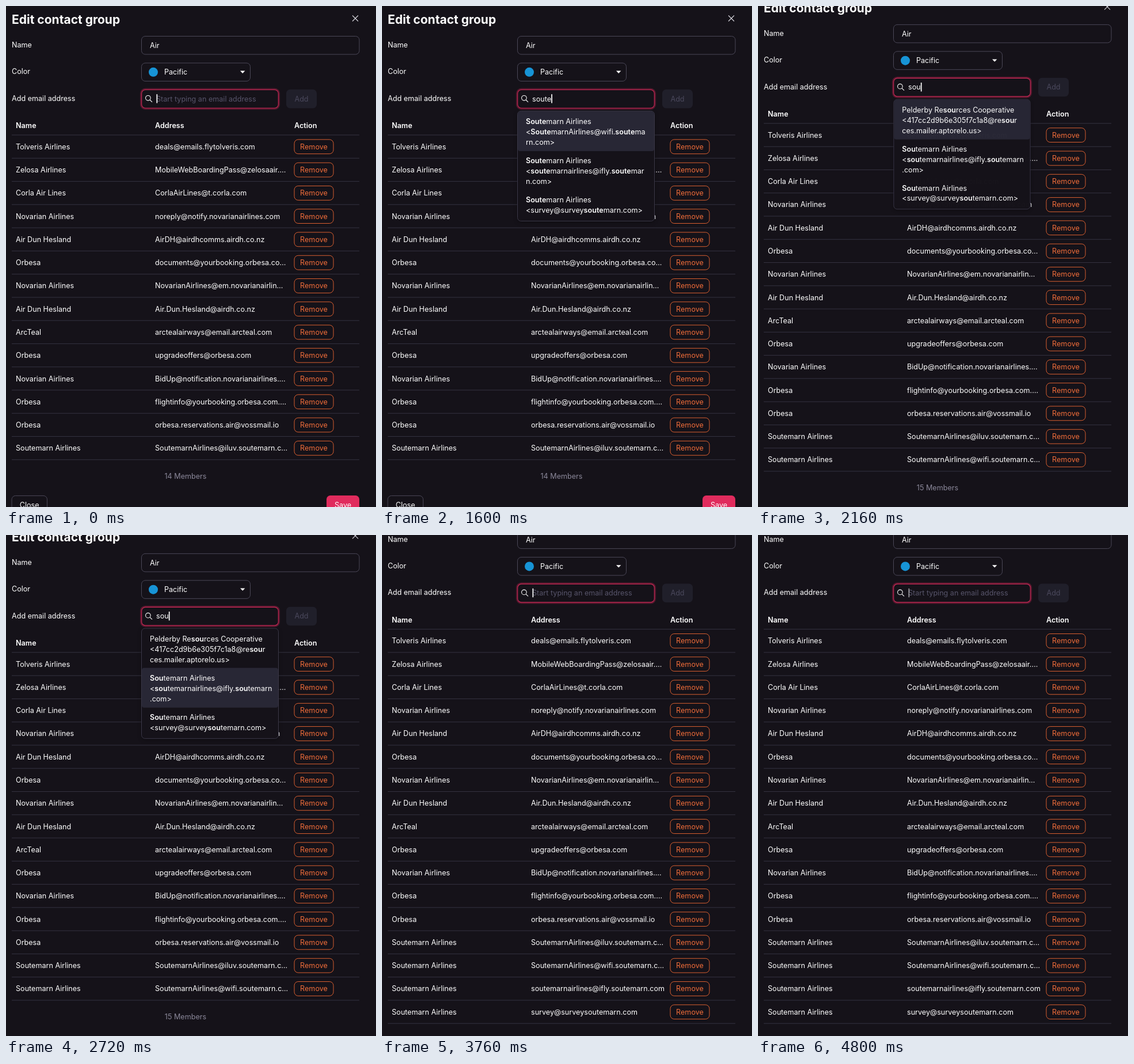
Animation, 643 px wide and 870 px high, one loop 4880 ms. Source, as an HTML page:

```html
<!DOCTYPE html>
<html lang="en">
<head>
<meta charset="utf-8">
<title>Edit contact group</title>
<style>
html, body { margin: 0; width: 100%; height: 100%; overflow: hidden; background: #151219; }
svg { display: block; width: 643px; height: 870px; }
text { font: 12.6px Inter, sans-serif; fill: #fff; white-space: pre; }
.b { font-weight: 600; }
.mid { text-anchor: middle; }
.box { fill: none; stroke: #4a4757; }
.rule { stroke: #343240; }
#drop { filter: drop-shadow(0 2px 3px rgba(0, 0, 0, .3)); }
</style>
</head>
<body>
<svg id="stage" viewBox="0 0 643 870"></svg>
<script>
const NS = 'http://www.w3.org/2000/svg';
const LOOP = 4880, STEP = 80, ROW = 40.27, BASE = 14;
const BG = '#151219';

const el = (parent, tag, attrs = {}, str) => {
  const n = document.createElementNS(NS, tag);
  for (const k in attrs) n.setAttribute(k, attrs[k]);
  if (str !== undefined) n.textContent = str;
  parent.appendChild(n);
  return n;
};
const text = (p, x, y, str, attrs = {}) => el(p, 'text', { x, y, ...attrs }, str);
const rect = (p, x, y, width, height, rx, attrs = {}) =>
  el(p, 'rect', { x, y, width, height, rx, ...attrs });
const clamp = v => Math.max(0, Math.min(1, v));
const show = (n, on) => n.setAttribute('visibility', on ? 'visible' : 'hidden');

const members = [
  ['Tolveris Airlines', 'deals@emails.flytolveris.com'],
  ['Zelosa Airlines', 'MobileWebBoardingPass@zelosaair.…'],
  ['Corla Air Lines', 'CorlaAirLines@t.corla.com'],
  ['Novarian Airlines', 'noreply@notify.novarianairlines.com'],
  ['Air Dun Hesland', 'AirDH@airdhcomms.airdh.co.nz'],
  ['Orbesa', 'documents@yourbooking.orbesa.co…'],
  ['Novarian Airlines', 'NovarianAirlines@em.novarianairlin…'],
  ['Air Dun Hesland', 'Air.Dun.Hesland@airdh.co.nz'],
  ['ArcTeal', 'arctealairways@email.arcteal.com'],
  ['Orbesa', 'upgradeoffers@orbesa.com'],
  ['Novarian Airlines', 'BidUp@notification.novarianairlines.…'],
  ['Orbesa', 'flightinfo@yourbooking.orbesa.com.…'],
  ['Orbesa', 'orbesa.reservations.air@vossmail.io'],
  ['Soutemarn Airlines', 'SoutemarnAirlines@iluv.soutemarn.c…'],
  ['Soutemarn Airlines', 'SoutemarnAirlines@wifi.soutemarn.c…'],
  ['Soutemarn Airlines', 'soutemarnairlines@ifly.soutemarn.com'],
  ['Soutemarn Airlines', 'survey@surveysoutemarn.com']
];

const air = 'Soutemarn Airlines';
const survey = [air, '<survey@surveysoutemarn.com>'];
const estate = ['Pelderby Resources Cooperative', '<417cc2d9b6e305f7c1a8@resour', 'ces.mailer.aptorelo.us>'];

// Each round: key times, dropdown opening, highlight moving down, row added.
const rounds = [
  { word: 'soute', keys: [1400, 1420, 1435, 1520, 1580], open: 1440, down: Infinity, add: 1840,
    items: [[air, '<SoutemarnAirlines@wifi.soutema', 'rn.com>'],
            [air, '<soutemarnairlines@ifly.soutemar', 'n.com>'], survey] },
  { word: 'sou', keys: [1920, 1980, 2015], open: 2020, down: 2560, add: 2960,
    items: [estate, [air, '<soutemarnairlines@ifly.soutemarn', '.com>'], survey] },
  { word: 'sou', keys: [3010, 3060, 3110], open: 3128, down: 3520, add: 3760,
    items: [estate, survey] }
];

const page = el(document.getElementById('stage'), 'g');

// Form
text(page, 10, 31.3, 'Edit contact group', { style: 'font-size:21px;font-weight:700' });
el(page, 'path', { d: 'M602 16.5l10 10m0-10l-10 10', stroke: '#d8d6de', 'stroke-width': 1.1 });
text(page, 10, 72, 'Name');
rect(page, 235.5, 52.5, 378.5, 31.5, 6.5, { class: 'box' });
text(page, 250, 73, 'Air');
text(page, 10, 118.3, 'Color');
rect(page, 235.5, 99, 189, 31.5, 6.5, { class: 'box' });
el(page, 'circle', { cx: 256, cy: 114.8, r: 8, fill: '#1794d6' });
text(page, 275, 119.4, 'Pacific');
el(page, 'path', { d: 'M407 112.6h8.4l-4.2 4.4z', fill: '#fff' });
text(page, 10, 164.8, 'Add email address');
rect(page, 234.5, 144.3, 240, 34.2, 7.5, { fill: 'none', stroke: '#e2265a', 'stroke-opacity': .32, 'stroke-width': 3 });
rect(page, 235.7, 145.5, 237.6, 31.8, 6.5, { fill: BG, stroke: '#cb2a57', 'stroke-width': 1.1 });
el(page, 'path', { d: 'M251.2 159.8a4.3 4.3 0 1 1-8.6 0a4.3 4.3 0 1 1 8.6 0M250 163l4 3.8',
  fill: 'none', stroke: '#fff', 'stroke-width': 1.1 });
const hint = text(page, 261, 165.6, 'Start typing an email address', { style: 'fill:#57546a' });
const query = text(page, 261, 165.6, '');
const caret = rect(page, 261.5, 153.2, 1.7, 15.4, 0, { fill: '#fff' });
rect(page, 487, 145, 53, 32.4, 6.5, { fill: '#201f2a' });
text(page, 513.5, 165.6, 'Add', { class: 'mid', style: 'fill:#4a485c' });

// Table
const rule = (p, y) => el(p, 'line', { x1: 10, x2: 614, y1: y, y2: y, class: 'rule' });
[['Name', 17], ['Address', 259], ['Action', 501]].forEach(([s, x]) =>
  text(page, x, 212.4, s, { class: 'b' }));
rule(page, 224);
const rows = members.map(([name, mail], i) => {
  const y = 244.3 + i * ROW, g = el(page, 'g');
  text(g, 17, y + 4.5, name);
  text(g, 259, y + 4.5, mail);
  rect(g, 501, y - 12.4, 68, 24.8, 6.8, { fill: 'none', stroke: '#d95f30' });
  text(g, 535, y + 4.5, 'Remove', { class: 'mid', style: 'fill:#f06d3a' });
  rule(g, y + 20);
  return g;
});

// Footer
const foot = el(page, 'g');
const total = text(foot, 312, 821, '', { class: 'mid', style: 'fill:#8b889a' });
rect(foot, 10, 850.4, 61.5, 32, 6.5, { class: 'box' });
text(foot, 40.7, 870.8, 'Close', { class: 'mid' });
rect(foot, 557, 850, 57, 32.4, 6.5, { fill: '#e02b5d' });
text(foot, 585.5, 870.8, 'Save', { class: 'mid' });

const drop = el(page, 'g', { id: 'drop' });

function marked(x, y, line, word) {
  const n = text(drop, x, y, '');
  line.split(new RegExp('(' + word + ')', 'i')).forEach((part, i) => {
    if (part) el(n, 'tspan', i % 2 ? { class: 'b' } : {}, part);
  });
}

function drawDrop(items, word, active) {
  drop.replaceChildren();
  const panel = rect(drop, 235.5, 182.3, 238, 0, 6, { fill: BG, stroke: '#3a3747' });
  let y = 184;
  items.forEach((lines, i) => {
    const h = lines.length * 18 + 14;
    if (i === active) rect(drop, 236, y - 1, 237, h + 1, 4, { fill: '#282735' });
    lines.forEach((s, k) => marked(250, y + 21.2 + k * 18, s, word));
    y += h;
  });
  panel.setAttribute('height', y + 3.5 - 182.3);
}

function caretAlpha(t) {
  const fade = s => Math.max(1 - clamp((t - s) / 280), clamp((t - s - 360) / 280));
  return t < 1400 ? fade(80) : fade(4280);
}

let drawn = '';
function update(t) {
  const added = rounds.filter(r => t >= r.add).length;
  const count = BASE + added;
  page.setAttribute('transform', `translate(0 ${-added * ROW / 2})`);
  rows.forEach((g, i) => show(g, i < count));
  foot.setAttribute('transform', `translate(0 ${added * ROW})`);
  total.textContent = count + ' Members';

  const r = rounds[added];
  const word = r ? r.word.slice(0, r.keys.filter(k => t >= k).length) : '';
  query.textContent = word;
  show(hint, !word);
  caret.setAttribute('x', word ? 261.2 + query.getComputedTextLength() : 261.5);
  caret.setAttribute('opacity', caretAlpha(t));

  const open = !!r && t >= r.open;
  show(drop, open);
  if (!open) return;
  const active = t >= r.down ? 1 : 0, key = [added, word, active].join();
  if (key !== drawn) drawDrop(r.items, word, active);
  drawn = key;
  const e = 1 - (1 - clamp((t - r.open) / 160)) ** 2;
  const s = .8 + .2 * e;
  drop.setAttribute('opacity', e);
  drop.setAttribute('transform', `translate(354.5 182) scale(${s}) translate(-354.5 -182)`);
}

const start = performance.now();
function tick() {
  const t = (performance.now() - start) % LOOP;
  update(Math.floor(t / STEP) * STEP);
  requestAnimationFrame(tick);
}
tick();
</script>
</body>
</html>
```
